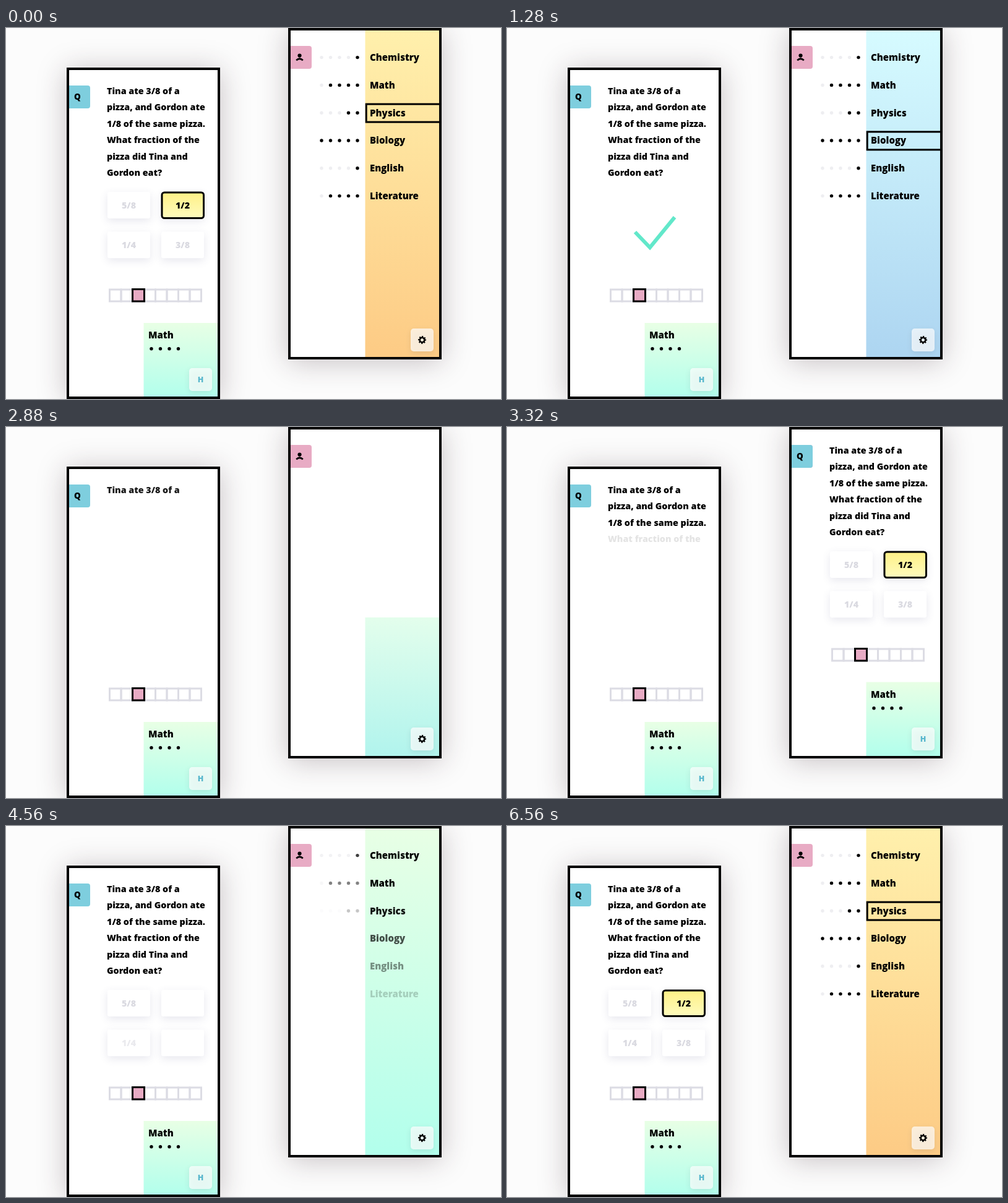
An HTML page with a canvas that plays this animation: 800 px wide and 600 px high, repeating every 6.68 s.

```html
<!DOCTYPE html>
<html lang="en">
<head>
<meta charset="utf-8">
<title>Quiz app</title>
<style>
html, body { margin: 0; width: 100%; height: 100%; overflow: hidden; background: #fcfcfc; }
canvas { display: block; }
</style>
</head>
<body>
<canvas id="stage" width="800" height="600"></canvas>
<script>
const c = document.getElementById('stage').getContext('2d');
const LOOP = 6680, PINK = '#e8abc4', TEAL = '#7ecede';
const ORANGE = [[255, 240, 172], [253, 203, 133]];
const BLUE = [[214, 251, 255], [173, 213, 241]];
const GREEN = [[232, 255, 229], [178, 255, 236]];
const lines = ['Tina ate 3/8 of a', 'pizza, and Gordon ate', '1/8 of the same pizza.',
  'What fraction of the', 'pizza did Tina and', 'Gordon eat?'];
const answers = ['5/8', '1/2', '1/4', '3/8'];
const subjects = [['Chemistry', 1], ['Math', 4], ['Physics', 2], ['Biology', 5], ['English', 1], ['Literature', 4]];
let t = 0;

// Progress of the current time through a span
const lin = (a, b) => Math.min(1, Math.max(0, (t - a) / (b - a)));
const ease = (a, b) => { const p = lin(a, b); return p * p * (3 - 2 * p); };
const mix = (a, b, p) => a.map((stop, i) => stop.map((v, j) => v + (b[i][j] - v) * p));
const rgb = v => `rgb(${v.map(Math.round)})`;

function faded(alpha, draw) {
  if (alpha <= 0) return;
  c.save();
  c.globalAlpha *= alpha;
  draw();
  c.restore();
}

function text(str, x, y, size, color = '#000', align = 'left') {
  c.font = `800 ${size}px "Open Sans", sans-serif`;
  c.textAlign = align;
  c.fillStyle = color;
  c.fillText(str, x, y);
}

function dot(x, y, color = '#000', r = 2.7) {
  c.fillStyle = color;
  c.beginPath();
  c.arc(x, y, r, 0, 7);
  c.fill();
}

function box(x, y, w, h, radius, fill) {
  c.fillStyle = fill;
  c.beginPath();
  c.roundRect(x, y, w, h, radius);
  c.fill();
}

function shadowed(x, y, w, h, radius, fill, dy, blur, color) {
  c.save();
  c.shadowOffsetY = dy;
  c.shadowBlur = blur;
  c.shadowColor = color;
  box(x, y, w, h, radius, fill);
  c.restore();
}

function gradient(y0, y1, colors) {
  const g = c.createLinearGradient(0, y0, 0, y1);
  colors.forEach((v, i) => g.addColorStop(i, rgb(v)));
  return g;
}

function phone(x, y, content) {
  c.save();
  c.translate(x, y);
  shadowed(98, 64, 248, 536, 0, '#fff', 4, 44, 'rgba(50,30,40,.27)');
  content();
  c.strokeStyle = '#000';
  c.lineWidth = 4;
  c.strokeRect(100, 66, 244, 532);
  c.restore();
}

function panel(top, colors) {
  box(222.5, top, 120, 596 - top, 0, gradient(top, 596, colors));
}

function button(icon) {
  shadowed(296, 550, 37, 37, 5, 'rgba(255,255,255,.7)', 3, 10, 'rgba(60,60,80,.16)');
  icon();
}

const helpIcon = () => text('H', 314.5, 572.5, 12.5, '#58b7cd', 'center');

function gearIcon() {
  c.save();
  c.strokeStyle = '#000';
  c.lineWidth = 2.6;
  c.beginPath();
  c.arc(314.5, 568.5, 3.8, 0, 2 * Math.PI);
  c.stroke();
  c.setLineDash([2.1, 2.06]);
  c.lineWidth = 2.4;
  c.beginPath();
  c.arc(314.5, 568.5, 5.3, -.2, 2 * Math.PI - .2);
  c.stroke();
  c.restore();
}

function quizBadge() {
  box(102, 93, 34, 37, [0, 4, 4, 0], TEAL);
  text('Q', 115.5, 115.5, 13.5, '#000', 'center');
}

function userBadge() {
  box(102, 93, 34, 37, [0, 4, 4, 0], PINK);
  dot(116.5, 108.6, '#000', 3.1);
  c.strokeStyle = '#000';
  c.lineWidth = 2.8;
  c.beginPath();
  c.moveTo(111.2, 116.3);
  c.quadraticCurveTo(116.5, 111.3, 121.8, 116.3);
  c.stroke();
}

function footer() {
  text('Math', 230, 502, 15);
  for (let i = 0; i < 4; i++) dot(235 + 14.5 * i, 518.7);
}

function progress(cell) {
  c.strokeStyle = '#dcdce4';
  c.lineWidth = 3;
  for (let i = 0; i < 8; i++) c.strokeRect(167.5 + 18.5 * i, 423, 18.5, 19);
  faded(cell, () => {
    c.fillStyle = PINK;
    c.strokeStyle = '#000';
    c.fillRect(204.5, 422.5, 19, 19.5);
    c.strokeRect(204.5, 422.5, 19, 19.5);
  });
}

function answer(i, shown, number, picked) {
  const x = 164 + 87 * (i % 2), y = 265 + 64.3 * (i >> 1);
  const label = color => text(answers[i], x + 34.5, y + 26.7, 14.3, color, 'center');
  faded(shown, () => {
    shadowed(x, y, 69, 43, 3, '#fff', 4, 14, 'rgba(70,70,120,.13)');
    faded(number, () => label('#dadae1'));
    faded(picked, () => {
      box(x + 1, y + 1, 67.5, 41.5, 4, gradient(y, y + 43, [[254, 240, 133], [254, 251, 190]]));
      c.strokeStyle = '#000';
      c.lineWidth = 3;
      c.stroke();
      label('#000');
    });
  });
}

const line = i => text(lines[i], 163, 107 + 26.4 * i, 14.3);

function check(shown, drawn) {
  faded(drawn ? shown : 0, () => {
    c.strokeStyle = '#62e8ca';
    c.lineWidth = 6;
    c.setLineDash([98 * drawn, 200]);
    c.beginPath();
    c.moveTo(207, 330);
    c.lineTo(231, 355);
    c.lineTo(271, 306);
    c.stroke();
  });
}

function leftPhone() {
  quizBadge();
  const leave = 1 - ease(1920, 2160);
  lines.forEach((_, i) => {
    const start = 2700 + 200 * i;
    faded(t < 2300 ? leave : lin(start, start + 200), () => line(i));
  });
  answers.forEach((_, i) => {
    const start = 4240 + 320 * (i % 2) + 160 * (i >> 1);
    const before = t < 2300;
    const shown = before ? 1 - ease(360 + 60 * i, 720 + 60 * i) : ease(3760 + 60 * i, 4060 + 60 * i);
    const picked = i === 1 ? (before ? 1 : ease(6040, 6400)) : 0;
    answer(i, shown, before ? 1 : lin(start, start + 280), picked);
  });
  check(leave, ease(880, 1280));
  progress(t < 2300 ? leave : ease(2320, 2560));
  panel(477, GREEN);
  footer();
  button(helpIcon);
}

// Outline around a subject, visible between two shares of its length
function mark(row, from, to) {
  if (to <= from) return;
  c.save();
  c.strokeStyle = '#000';
  c.lineWidth = 3;
  if (to - from < 1) {
    c.setLineDash([298 * (to - from), 298]);
    c.lineDashOffset = -298 * from;
  }
  c.strokeRect(224.2, 97.5 + 44.8 * row, 120, 29);
  c.restore();
}

function list() {
  const leave = 1 - ease(2320, 2800);
  const arrive = start => t < 3000 ? leave : lin(start, start + 320);
  subjects.forEach(([name, level], i) => {
    const y = 112 + 44.8 * i;
    faded(arrive(4100 + 80 * i), () => text(name, 230, y + 5, 15));
    faded(arrive(4320 + 85 * i), () => {
      for (let j = 0; j < 5; j++) dot(152 + 14.5 * j, y - .4, j < 5 - level ? '#eeeef1' : '#000');
    });
  });
  if (t < 900) mark(2, lin(560, 900), 1);
  else if (t < 2800) faded(leave, () => mark(3, 0, lin(900, 1280)));
  else {
    mark(1, lin(6000, 6400), lin(4880, 5200));
    mark(2, 0, lin(6200, 6560));
  }
}

function rightPhone() {
  const closed = ease(2640, 3000) - ease(3920, 4320);
  const quiz = ease(2880, 3240) - ease(3660, 3960);
  const badge = ease(2960, 3240) - ease(3900, 4200);
  let colors = mix(ORANGE, BLUE, ease(560, 1280));
  colors = mix(colors, GREEN, ease(2640, 3000));
  colors = mix(colors, ORANGE, ease(6040, 6560));

  userBadge();
  faded(badge, quizBadge);
  panel(68 + 408.5 * closed, colors);
  list();
  faded(quiz, () => {
    lines.forEach((_, i) => line(i));
    answers.forEach((_, i) => answer(i, 1, 1, i === 1 ? 1 : 0));
    progress(1);
    footer();
  });
  button(() => {
    faded(1 - badge, gearIcon);
    faded(badge, helpIcon);
  });
}

function frame() {
  t = performance.now() % LOOP;
  c.fillStyle = '#fcfcfc';
  c.fillRect(0, 0, 800, 600);
  phone(0, 0, leftPhone);
  phone(358, -64, rightPhone);
  requestAnimationFrame(frame);
}
frame();
</script>
</body>
</html>
```
